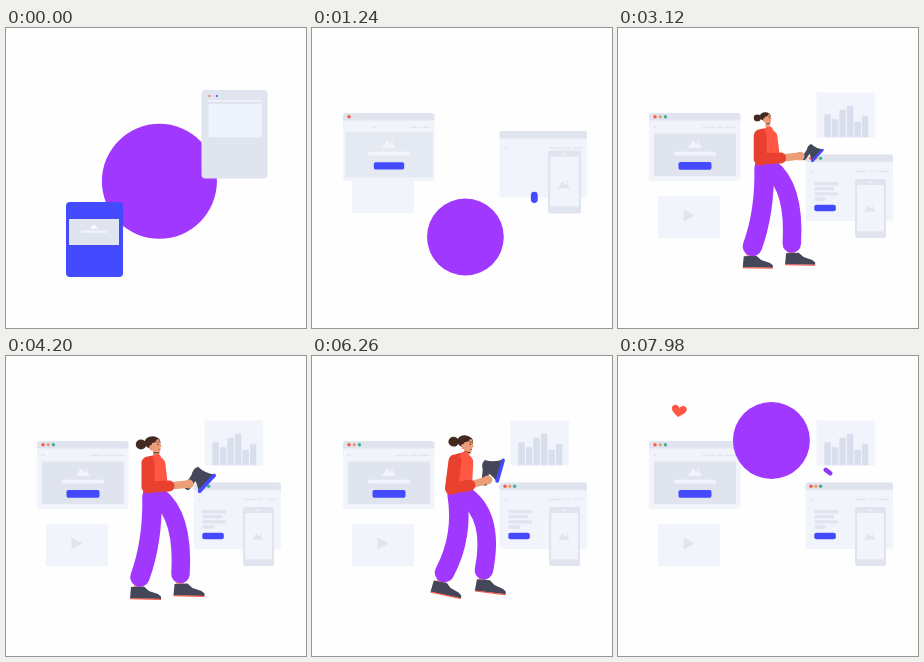
Write an HTML page with a canvas that moves like this. It is 300 px wide and 300 px high and loops after 8000 ms.

```html
<!DOCTYPE html>
<html lang="en">
<head>
<meta charset="utf-8">
<title>Promotion loop</title>
<style>
html, body { margin: 0; width: 100%; height: 100%; overflow: hidden; background: #fefefe; }
canvas { display: block; width: 100vw; height: 100vh; }
</style>
</head>
<body>
<canvas id="stage"></canvas>
<script>
const LOOP = 8000;
const PURPLE = '#a138ff', BLUE = '#444bff', RED = '#ff5744', DEEP = '#e8412f';
const PALE = '#f1f5fb', GREY = '#dfe4ee', SLATE = '#44465a', SKIN = '#eb9f79', HAIR = '#43291f';
const canvas = document.getElementById('stage');
const ctx = canvas.getContext('2d');

const mix = (a, b, p) => a + (b - a) * p;
const mixAll = (a, b, p) => a.map((v, i) => mix(v, b[i], p));
const smooth = p => p * p * (3 - 2 * p);

// Eased value from alternating times and values.
function key(t, ...k) {
  if (t <= k[0]) return k[1];
  for (let i = 2; i < k.length; i += 2) {
    if (t < k[i]) return mix(k[i - 1], k[i + 1], smooth((t - k[i - 2]) / (k[i] - k[i - 2])));
  }
  return k[k.length - 1];
}

function blend(a, b, p) {
  const c = mixAll(a, b, p).map(Math.round);
  return `rgb(${c})`;
}

function box(x, y, w, h, color, r = 0) {
  ctx.fillStyle = color;
  ctx.beginPath();
  ctx.roundRect(x, y, w, h, r);
  ctx.fill();
}

function oval(x, y, rx, ry, color) {
  if (rx <= 0 || ry <= 0) return;
  ctx.fillStyle = color;
  ctx.beginPath();
  ctx.ellipse(x, y, rx, ry, 0, 0, Math.PI * 2);
  ctx.fill();
}

function poly(color, ...p) {
  ctx.fillStyle = color;
  ctx.beginPath();
  for (let i = 0; i < p.length; i += 2) ctx.lineTo(p[i], p[i + 1]);
  ctx.fill();
}

function curve(a, b, c, width, color) {
  ctx.strokeStyle = color;
  ctx.lineWidth = width;
  ctx.lineCap = ctx.lineJoin = 'round';
  ctx.beginPath();
  ctx.moveTo(a[0], a[1]);
  ctx.quadraticCurveTo(b[0], b[1], c[0], c[1]);
  ctx.stroke();
}

const line = (a, b, width, color) => curve(a, a, b, width, color);

// Draws around a centre with a scale and an opacity.
function zoom(x, y, scale, alpha, draw) {
  if (scale <= 0 || alpha <= 0) return;
  ctx.save();
  ctx.globalAlpha *= Math.min(1, alpha);
  ctx.translate(x, y);
  ctx.scale(scale, scale);
  ctx.translate(-x, -y);
  draw();
  ctx.restore();
}

function place(x, y, angle, scale, draw) {
  ctx.save();
  ctx.translate(x, y);
  ctx.rotate(angle * Math.PI / 180);
  ctx.scale(scale, scale);
  draw();
  ctx.restore();
}

function fit(from, to, draw, alpha = 1) {
  ctx.save();
  ctx.globalAlpha *= Math.max(0, Math.min(1, alpha));
  ctx.translate(to[0], to[1]);
  ctx.scale(to[2] / from[2], to[3] / from[3]);
  ctx.translate(-from[0], -from[1]);
  draw();
  ctx.restore();
}

function morph(from, to, p, drawOld, drawNew) {
  const rect = mixAll(from, to, p);
  if (p < 0.9) fit(from, rect, drawOld);
  fit(to, rect, drawNew, p * 1.1);
}

function picture(x, y, color) {
  poly(color, x - 7, y + 4, x - 2, y - 4, x + 1, y, x + 3, y - 1.5, x + 7, y + 4);
  oval(x + 3.5, y - 3.2, 1, 1, color);
}

function dots(t, start, x, y, gap) {
  [RED, '#f39a72', '#45ad98'].forEach((c, i) => {
    const a = key(t, start + i * 130, 0, start + 200 + i * 130, 1);
    zoom(x + i * gap, y, a, a, () => oval(x + i * gap, y, 1.7, 1.7, c));
  });
}

function frame(x, y, w, h) {
  box(x, y, w, h, PALE, 3);
  box(x, y, w, 7.5, GREY, [3, 3, 0, 0]);
}

function nav(x, y, w) {
  [[0, .37], [.42, .21], [.68, .32]].forEach(([a, b]) => box(x + a * w, y, b * w, 1.6, '#e3e8f2', .8));
}

function blueCard() {
  box(60, 174, 57, 75, BLUE, 4);
  box(63, 191, 50, 26, GREY);
  zoom(88, 198.5, .5, 1, () => picture(88, 198.5, '#fff'));
  box(75, 202.5, 26, 2.3, PALE, 1);
}

function greyCard() {
  box(195.5, 62, 66, 88.5, GREY, 4);
  [RED, '#f4d4d0', BLUE].forEach((c, i) => oval(203.5 + i * 3.7, 68, 1, 1, c));
  box(202, 72, 54, 1.5, PALE);
  box(202.5, 76, 53.5, 33.3, '#eff3fd', 1);
}

function leftWindow(t) {
  frame(31, 85, 91.5, 68);
  dots(t, 1020, 37, 88.8, 5.2);
  box(key(t, 1000, 70, 1240, 60, 1600, 35), 98.3, 4, 1.4, GREY, .7);
  const w = key(t, 1000, 4, 1240, 20, 1500, 34);
  nav(118 - w, 98.4, w);
  zoom(77, 127, key(t, 1000, 1.2, 1240, 1.07, 1480, 1), key(t, 850, 0, 1240, .65, 1480, 1),
    () => box(36, 105.5, 82, 42.5, GREY));
  const a = key(t, 950, 0, 1200, 1);
  zoom(77, 116, a, a, () => picture(77, 116, PALE));
  zoom(77, 125.5, a, a, () => box(56, 123.8, 42, 3.6, PALE, 1));
  zoom(77, 138, key(t, 950, 0, 1150, 1.1, 1240, .92, 1500, 1), 1, () => box(60.5, 134, 33, 7.8, BLUE, 1.8));
}

function rightWindow(t) {
  frame(187.5, 126.5, 87.5, 66.5);
  dots(t, 1500, 193, 130.3, 4.8);
  box(192, 142.8, 3, 1.2, GREY);
  nav(237, 142.6, 34);
  zoom(208, 163, key(t, 2000, 1.55, 2340, 1.33, 2700, 1), key(t, 2000, 0, 2280, 1), () => {
    [23.5, 19.5, 23.5, 11.5].forEach((w, i) => box(196.5, 154 + i * 5.1, w, 3.4, GREY, .6));
  });
  zoom(207, 180, key(t, 1950, 0, 2200, 1.1, 2340, .93, 2550, 1), 1, () => box(196.3, 176.8, 21.5, 6.4, BLUE, 2));
}

function chart(t) {
  const y = key(t, 1300, 126, 1750, 60, 1900, 64.5);
  if (t < 1290) return;
  ctx.save();
  ctx.translate(0, y - 64.5);
  box(198.5, 64.5, 58.5, 45, PALE);
  [23, 18, 27.5, 31.5, 15.5, 21].forEach((h, i) => {
    const g = h * key(t, 1850 + i * 90, 0, 2370 + i * 90, 1);
    box(206.4 + i * 7.5, 109.3 - g, 6.4, g, '#d8deec', [1, 1, 0, 0]);
  });
  ctx.restore();
}

function video(t) {
  if (t < 950) return;
  const y = key(t, 950, 104, 1240, 143, 1520, 171, 1640, 168);
  box(40, y, 62, 42, PALE);
  const a = key(t, 1420, 0, 1700, 1);
  zoom(70, y + 19.5, a, a, () => poly(GREY, 65.5, y + 13.5, 76.5, y + 19.5, 65.5, y + 25.3));
}

function phone(t) {
  const dy = key(t, 900, -36, 1240, -26.5, 1560, 2, 1680, 0);
  zoom(252.5, 180.5 + dy, key(t, 850, 0, 1100, 1.12, 1240, 1.07, 1560, 1), 1, () => {
    box(237, 151 + dy, 31, 59, GREY, 2);
    box(239.2, 157 + dy, 26.6, 46.3, PALE);
    box(250, 153.7 + dy, 5, 1.2, PALE, .6);
    zoom(252, 180.5, .82, 1, () => picture(252, 180.5 + dy * 1.1, GREY));
  });
}

function ball(t) {
  const y = key(t, 100, 153.3, 430, 209, 1300, 209, 1580, 85, 2480, 85, 2760, 134, 2800, 84.5);
  const r = key(t, 0, 57.5, 180, 40, 450, 70, 840, 45, 1000, 38.4, 1320, 38.4, 1600, 72, 2000, 40,
    2230, 71, 2340, 63, 2480, 46, 2600, 25, 2800, 0, 6890, 0, 7180, 75, 7400, 57.5, 7720, 38.5);
  const squash = key(t, 2230, 0, 2340, 1.7, 2480, 0);
  oval(153.4, y, r - squash, r + squash, PURPLE);
}

function bean(t) {
  if (t > 1050 && t < 2820) {
    const p = key(t, 1300, 0, 2200, 1), out = key(t, 2460, 0, 2780, 1);
    const x = mix(mix(222.3, 228, p), 150, out), y = mix(mix(169.4, 116, p), 118, out);
    const color = blend([68, 75, 255], [255, 87, 68], key(t, 1500, 0, 1900, 1));
    const s = key(t, 1050, 0, 1200, 1), h = mix(2.2, 12.5, p);
    const bend = mix(0, 5, p);
    zoom(x, y, s, 1, () => curve([x - bend * .4, y - h], [x + bend, y], [x + bend * .1, y + h], mix(6.8, 14, p), color));
  }
  if (t > 6600) {
    const p = key(t, 6900, 0, 7700, 1);
    const x = mix(193.5, 210, p), y = mix(172.7, 115.6, p);
    const color = blend([255, 87, 68], [138, 58, 245], key(t, 7150, 0, 7600, 1));
    place(x, y, mix(-20, 36, p), key(t, 6600, 0, 6820, 1), () => {
      const h = mix(10.2, 2.8, p);
      curve([-h, 0], [0, mix(-2, 0, p)], [h, 0], mix(13.5, 4.6, p), color);
    });
  }
}

function heart(t) {
  place(61, 55, 8, key(t, 7420, 0, 7650, 1.2, 7800, 1), () => {
    ctx.fillStyle = RED;
    ctx.beginPath();
    ctx.moveTo(0, 6);
    ctx.bezierCurveTo(-4, 3.5, -8, 0, -7.5, -2.5);
    ctx.bezierCurveTo(-7, -6.5, -2, -6.5, 0, -3);
    ctx.bezierCurveTo(2, -6.5, 7, -6.5, 7.5, -2.5);
    ctx.bezierCurveTo(8, 0, 4, 3.5, 0, 6);
    ctx.fill();
  });
}

// Joints are [x, y]; head, horn and shoes carry an angle as well.
const LOW = {
  head: [149, 89, 0], chest: [150, 110], waist: [147, 128], shoulder: [142, 107], elbow: [142, 131],
  wrist: [163, 130], hand: [183, 128], horn: [201, 127.5, 43],
  hipL: [146, 140], kneeL: [147, 185], footL: [134, 221, 0],
  hipR: [152, 140], kneeR: [178, 160], footR: [174.5, 218, 0]
};
const HIGH = {
  ...LOW, head: [152, 89.5, 6], chest: [150, 109], shoulder: [141, 107], elbow: [136, 134],
  wrist: [157, 128], hand: [175, 117], horn: [186.5, 107, 7]
};
const LEAP = {
  head: [165.5, 85, 18], chest: [157, 103], waist: [142, 121], shoulder: [149, 99], elbow: [150, 127],
  wrist: [161, 133], hand: [178, 145], horn: [194, 138, 43],
  hipL: [142, 132], kneeL: [167, 165], footL: [128, 203, 45],
  hipR: [148, 132], kneeR: [198, 155], footR: [164, 203, 23]
};

function mixPose(a, b, p) {
  const out = {};
  for (const k in a) out[k] = mixAll(a[k], b[k], p);
  return out;
}

function collapse(pose, x, y, p) {
  const out = {};
  for (const k in pose) out[k] = mixAll(pose[k], [x, y, pose[k][2]], p).slice(0, pose[k].length);
  return out;
}

function horn(h, s) {
  place(...h, s, () => {
    line([-14, 3], [-12, 15.5], 6.5, SLATE);
    ctx.fillStyle = SLATE;
    ctx.beginPath();
    ctx.moveTo(-18, -6);
    ctx.quadraticCurveTo(-8, -6, 0, -12);
    ctx.lineTo(0, 12);
    ctx.quadraticCurveTo(-8, 5, -16, 5.5);
    ctx.quadraticCurveTo(-21, 0, -18, -6);
    ctx.fill();
    box(-2, -12.5, 3.6, 25, BLUE, 1.5);
  });
}

function shoe(f, dx, s) {
  place(f[0] + dx, f[1], f[2], s, () => {
    line([-2 - dx, 4], [-3, 12], 7, SKIN);
    poly(SLATE, -9, 10, 4, 9.5, 9, 14, 18, 17, 21, 19.5, 21, 22, -10, 21.5);
    line([-9.5, 21.8], [20.5, 22.4], 1.1, RED);
  });
}

function head(h, s) {
  place(...h, s, () => {
    line([1, 4], [1, 12], 6, SKIN);
    oval(-14, -.5, 5.2, 4.9, HAIR);
    oval(-2.5, -2.5, 8, 6.2, HAIR);
    ctx.fillStyle = SKIN;
    ctx.beginPath();
    ctx.moveTo(-3, -2);
    ctx.quadraticCurveTo(1, -2, 2, -6);
    ctx.quadraticCurveTo(5, -5.5, 5, -2);
    ctx.lineTo(6.6, 1.5);
    ctx.lineTo(5.3, 2.3);
    ctx.quadraticCurveTo(6, 8, 2.5, 8);
    ctx.quadraticCurveTo(-3, 8, -4, 2);
    ctx.fill();
    oval(-4, 2, 1.8, 2, SKIN);
    oval(3, -.5, .6, .8, HAIR);
    line([1.8, -2.8], [4, -2.8], .6, HAIR);
    line([3.7, 4.6], [5, 4.3], .9, DEEP);
    oval(-4, 4.6, .8, .8, RED);
    line([-1.2, 7.7], [4.2, 7.9], 1, '#37303a');
  });
}

function person(t) {
  if (t < 2600 || t > 7180) return;
  let pose = mixPose(LOW, HIGH, key(t, 4380, 0, 4900, 1));
  pose = mixPose(pose, LEAP, key(t, 6050, 0, 6700, 1));
  const bob = key(t, 5000, 0, 5160, -4, 5320, 0) + key(t, 3250, 0, 3360, -3, 3520, 0);
  for (const k of ['head', 'chest', 'shoulder', 'elbow', 'wrist', 'hand', 'horn']) pose[k][1] += bob;
  const early = t < 4500;
  const small = early ? key(t, 2600, 1, 3180, 0) : key(t, 6890, 0, 7150, 1);
  pose = collapse(pose, early ? 150 : 153.5, early ? 132 : 90, small);
  const s = 1 - small, w = Math.min(1, s * 1.5);
  const { chest, waist, shoulder, elbow, wrist, hand } = pose;
  const pop = early ? key(t, 2900, 0, 3250, 1) : s;

  head(pose.head, pop);
  shoe(pose.footL, 0, s);
  shoe(pose.footR, 3, s);
  line([chest[0] - 3, chest[1]], waist, 21 * w, DEEP);
  line([chest[0] + 1, chest[1] - 1], [waist[0] + 6, waist[1] - 1], 17 * w, RED);
  line([chest[0] + 1, chest[1] - 8], [chest[0] + 2, chest[1]], 8 * w, RED);
  curve(pose.hipR, pose.kneeR, pose.footR, 18.5 * w, PURPLE);
  curve(pose.hipL, pose.kneeL, pose.footL, 19.5 * w, PURPLE);
  horn(pose.horn, pop);
  line(wrist, hand, 7.5 * w, SKIN);
  oval(hand[0], hand[1], 4.6 * w, 4.4 * w, SKIN);
  line(shoulder, elbow, 13 * w, DEEP);
  line(elbow, wrist, 11 * w, DEEP);
}

function draw(t) {
  const front = t > 2560;
  if (!front) ball(t);
  chart(t);
  video(t);
  const p = key(t, 60, 0, 380, 1.1, 560, 1);
  morph([60, 174, 57, 75], [31, 85, 91.5, 68], p, blueCard, () => leftWindow(t));
  const y = key(t, 0, 60, 600, 62, 1240, 103, 1560, 129, 1680, 126.5);
  ctx.save();
  ctx.translate(0, (y - 126.5) * Math.min(1, p));
  morph([195.5, 62, 66, 88.5], [187.5, 126.5, 87.5, 66.5], p, greyCard, () => rightWindow(t));
  ctx.restore();
  phone(t);
  person(t);
  if (front) ball(t);
  bean(t);
  heart(t);
}

function tick() {
  const dpr = window.devicePixelRatio || 1;
  const w = Math.round(innerWidth * dpr), h = Math.round(innerHeight * dpr);
  if (canvas.width !== w || canvas.height !== h) {
    canvas.width = w;
    canvas.height = h;
  }
  ctx.setTransform(w / 300, 0, 0, h / 300, 0, 0);
  ctx.fillStyle = '#fefefe';
  ctx.fillRect(0, 0, 300, 300);
  draw(performance.now() % LOOP);
  requestAnimationFrame(tick);
}
tick();
</script>
</body>
</html>
```
